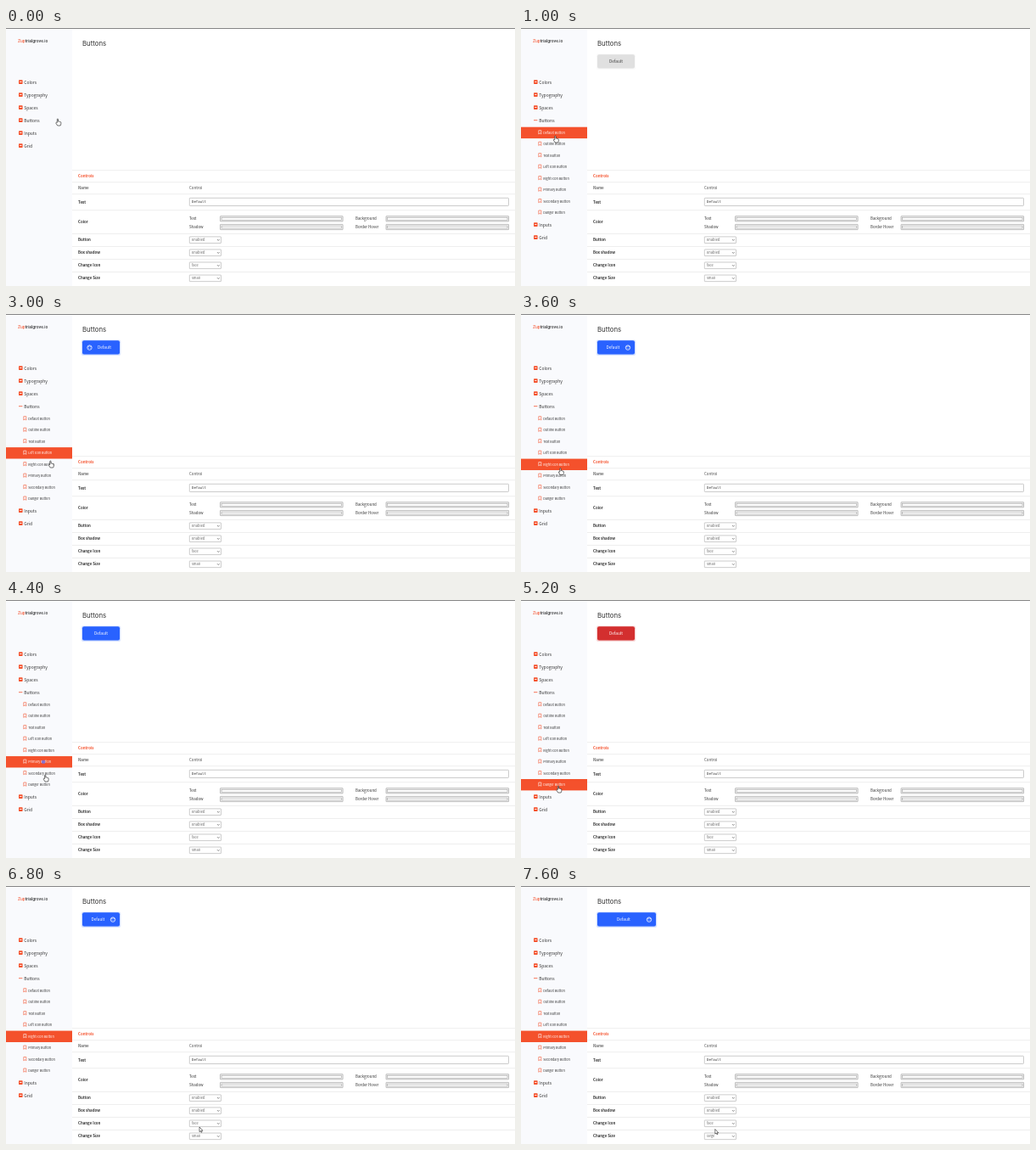
Animation, 600 px wide and 304 px high, one loop 8000 ms. Source, as an HTML page:

```html
<!DOCTYPE html>
<html lang="en">
<head>
<meta charset="utf-8">
<title>Buttons</title>
<style>
  html, body { margin: 0; width: 100%; height: 100%; overflow: hidden; background: #fff; }
  svg { display: block; width: 100%; height: 100%; }
  text { font-family: "Noto Sans CJK JP", "Noto Sans", sans-serif; fill: #333; white-space: pre; }
  .brand { font-family: Inter, sans-serif; font-size: 4.7px; font-weight: 500; }
  .title { font-family: Inter, sans-serif; font-size: 7.8px; }
  .nav { font-size: 5px; }
  .sub { font-size: 3.78px; }
  .label { font-size: 4.4px; }
  .bold { font-weight: 700; }
  .option { font-size: 4px; fill: #666; }
  .mono { font-family: "DejaVu Sans Mono", monospace; font-size: 4.03px; }
  .btn { font-size: 4.75px; font-weight: 500; text-anchor: middle; }
</style>
</head>
<body>
<svg id="stage" viewBox="0 0 600 304"></svg>
<script>
const LOOP = 8000, STEP = 200;
const RED = '#f4512c', BLUE = '#2962ff';
const NS = 'http://www.w3.org/2000/svg';
const stage = document.getElementById('stage');

function add(tag, attrs, parent = stage) {
  const node = document.createElementNS(NS, tag);
  set(node, attrs);
  parent.appendChild(node);
  return node;
}
function set(node, attrs) {
  for (const key in attrs) node.setAttribute(key, attrs[key]);
}
function text(x, y, str, cls, parent, fill) {
  const node = add('text', { x, y, class: cls }, parent);
  node.textContent = str;
  if (fill) node.style.fill = fill;
  return node;
}
const rect = (x, y, width, height, fill, more = {}, parent) =>
  add('rect', { x, y, width, height, fill, ...more }, parent);
const path = (d, stroke, width, more = {}, parent) =>
  add('path', { d, fill: 'none', stroke, 'stroke-width': width, ...more }, parent);
const show = (node, on) => set(node, { visibility: on ? 'visible' : 'hidden' });

// Page frame
rect(0, 0, 600, 304, '#fff');
rect(0, 0, 78, 304, '#f9fafd');
rect(0, 0, 600, 1, '#858585');
const brand = text(14, 16.6, '', 'brand');
for (const [str, fill] of [['Zup', RED], ['trialgrove.io', '#222']]) {
  const part = add('tspan', {}, brand);
  part.textContent = str;
  part.style.fill = fill;
}
text(90, 21.4, 'Buttons', 'title');

// Sidebar
const sections = ['Colors', 'Typography', 'Spaces', 'Buttons', 'Inputs', 'Grid'].map((name, i) => {
  const group = add('g', {});
  const box = rect(15, -2.7, 4.6, 4.6, RED, { rx: 0.6 }, group);
  const mark = path('M16 -.5H18.6', '#fff', 0.8, {}, group);
  text(21.2, 1.6, name, 'nav', group);
  return { group, box, mark, y: 64 + 15 * i };
});
const submenu = add('g', {});
const subs = ['Default', 'Outline', 'Text', 'Left Icon', 'Right Icon', 'Primary', 'Secondary', 'Danger'].map((name, i) => {
  const y = 123.4 + 13.47 * i;
  const back = rect(0, y - 6.7, 78, 13.4, RED, {}, submenu);
  const icon = path(`M20.8 ${y + 1.6}V${y - 2.7}H23.8V${y + 1.6}L22.3 ${y + 0.5}Z`, RED, 0.6, {}, submenu);
  const label = text(26.2, y + 1.4, name + ' Button', 'sub', submenu);
  return { back, icon, label };
});
const glint = rect(42, 188.7, 4.2, 4, '#6f6fe8', { rx: 1.2, opacity: 0.8 });

// Preview button
const preview = add('g', {});
const shadows = [1.3, 0.6].map(grow => ({ grow, node: rect(0, 0, 0, 0, BLUE, { rx: 2.6, opacity: 0.14 }, preview) }));
const face = rect(90, 31.3, 44, 16.2, BLUE, { rx: 2 }, preview);
const caption = text(112, 41.4, 'Default', 'btn', preview);
const smiley = add('g', {}, preview);
add('circle', { r: 2.7, fill: 'none', stroke: '#fff', 'stroke-width': 0.75 }, smiley);
path('M-2.4 -.6Q-.4 -.7 .1 -2Q.9 -.6 2.5 -.8', '#fff', 0.65, {}, smiley);
for (const x of [-0.95, 0.95]) add('circle', { cx: x, cy: 0.6, r: 0.42, fill: '#fff' }, smiley);

// Controls panel
for (const y of [167.5, 181.5, 195.5, 214.5, 242.2, 257.2, 272.2, 287.2]) {
  rect(78, y, 522, 0.6, '#e3e3e3');
}
text(85, 176.4, 'Controls', 'label bold', stage, RED);
text(85, 190.3, 'Name', 'label bold', stage, '#666');
text(216, 190.3, 'Control', 'label', stage, '#444');
text(85, 207, 'Text', 'label bold');
text(85, 230.2, 'Color', 'label bold');
rect(216.3, 200.3, 376.2, 9.2, '#fff', { rx: 0.8, stroke: '#aaa', 'stroke-width': 0.6 });
text(219, 206.4, 'Default', 'mono');

[['Text', 216, 252.5, 224.8], ['Background', 412, 448, 224.8],
 ['Shadow', 216, 252.5, 234.5], ['Border Hover', 412, 448, 234.5]].forEach(([name, tx, x, y]) => {
  text(tx, y + 1.6, name, 'label');
  rect(x, y - 3.1, 144.6, 6.2, '#efefef', { stroke: '#999', 'stroke-width': 0.6, rx: 0.4 });
  rect(x + 1.6, y - 1.3, 141.4, 2.7, '#fff', { stroke: '#999', 'stroke-width': 0.5 });
});

const selects = [['Button', 'Enabled'], ['Box shadow', 'Enabled'], ['Change Icon', 'face'], ['Change Size', 'small']]
  .map(([name, value], i) => {
    const y = 249.7 + 15.05 * i;
    text(85, y + 1.6, name, 'label bold');
    rect(216.3, y - 3.8, 37.2, 7.6, '#fff', { stroke: '#aaa', 'stroke-width': 0.6, rx: 0.5 });
    path(`M249 ${y - 0.6}l1.3 1.3l1.3 -1.3`, '#444', 0.65);
    return text(219, y + 1.4, value, 'option');
  });

// Pointers, centred on their own origin
const ink = { fill: '#fff', 'stroke-linejoin': 'round' };
const hand = path('M-1.7 .6V-3.3Q-1.7 -4 -1.1 -4T-.5 -3.3V-.9Q.2 -1.4 .7 -.7Q1.4 -1.1 1.8 -.3Q2.8 -.6 2.8 .5V1.8Q2.8 2.8 2.1 4H-1.3L-3 1.4Q-3.4 .4 -2.6 .2Z', '#222', 0.65, ink);
const arrow = path('M-1.6 -3V2.7L-.3 1.5L.6 3.4L1.5 3L.7 1.2H2.4Z', '#222', 0.6, ink);

// Timeline
const picks = [[0, -1], [800, 0], [1200, 1], [1600, 2], [2200, 3], [3200, 4], [3800, 5], [4600, 6], [5000, 7], [6200, 4]];
const sizes = [[0, 'small'], [7200, 'medium'], [7400, 'large']];
const widths = { small: 44, medium: 56, large: 69 };
const route = [
  [0, 62, 111], [400, 48, 111], [800, 41, 124], [1200, 42, 138], [1600, 43, 152],
  [2000, 44, 167], [2400, 46, 167], [3000, 53.5, 177], [3400, 50, 180], [3800, 45, 191],
  [4400, 47.3, 210], [4800, 46, 217], [5200, 45, 223], [5800, 45, 223], [6200, 46, 179],
  [6600, 190, 262], [6800, 229.6, 287], [7600, 230.4, 289.5]
];
const styles = [
  { fill: '#e0e0e0', ink: '#3f3f3f' },
  { fill: '#fff', ink: BLUE, line: BLUE },
  { fill: 'none', ink: BLUE },
  { fill: BLUE, ink: '#fff', icon: 'left' },
  { fill: BLUE, ink: '#fff', icon: 'right' },
  { fill: BLUE, ink: '#fff' },
  { fill: '#455a64', ink: '#fff' },
  { fill: '#d32f2f', ink: '#fff' }
];

const latest = (keys, t) => keys.filter(key => key[0] <= t).pop()[1];

function follow(t) {
  const i = route.findIndex(key => key[0] > t);
  if (i < 0) return route[route.length - 1].slice(1);
  const a = route[i - 1], b = route[i], k = (t - a[0]) / (b[0] - a[0]);
  return [a[1] + (b[1] - a[1]) * k, a[2] + (b[2] - a[2]) * k];
}

function drawMenu(open, pick) {
  sections.forEach(({ group, box, mark, y }, i) => {
    set(group, { transform: `translate(0 ${y + (open && i > 3 ? 108 : 0)})` });
    if (i !== 3) return;
    show(box, !open);
    set(mark, open ? { d: 'M15 -.3H19.4', stroke: RED } : { d: 'M16 -.5H18.6', stroke: '#fff' });
  });
  set(submenu, { display: open ? 'inline' : 'none' });
  subs.forEach(({ back, icon, label }, i) => {
    const on = i === pick;
    set(back, { opacity: on ? 1 : 0 });
    set(icon, { stroke: on ? '#fff' : RED });
    label.style.fill = on ? '#fff' : '#333';
  });
}

function drawPreview(pick, size) {
  set(preview, { display: pick < 0 ? 'none' : 'inline' });
  if (pick < 0) return;
  const look = styles[pick], width = widths[size];
  const shift = { left: 4, right: -3.6 }[look.icon] || 0;
  set(face, { width, fill: look.fill, stroke: look.line || 'none', 'stroke-width': 0.6 });
  for (const { grow, node } of shadows) {
    set(node, { x: 90 - grow, y: 31.5 - grow, width: width + 2 * grow, height: 16.2 + 2 * grow,
      fill: look.line ? 'none' : look.fill });
  }
  set(caption, { x: 90 + width / 2 + shift });
  caption.style.fill = look.ink;
  set(smiley, { display: look.icon ? 'inline' : 'none',
    transform: `translate(${look.icon === 'left' ? 98.5 : 82 + width} 39.6)` });
}

function draw(time) {
  const t = Math.floor((time % LOOP) / STEP) * STEP;
  const pick = latest(picks, t), size = latest(sizes, t);
  drawMenu(t >= 400, pick);
  drawPreview(pick, size);
  selects[3].textContent = size;
  show(glint, t === 4400);
  const pos = `translate(${follow(t).join(' ')})`;
  for (const node of [hand, arrow]) set(node, { transform: pos });
  show(hand, t < 6400);
  show(arrow, t >= 6400);
}

const start = performance.now();
function tick() {
  draw(performance.now() - start);
  requestAnimationFrame(tick);
}
tick();
</script>
</body>
</html>
```
